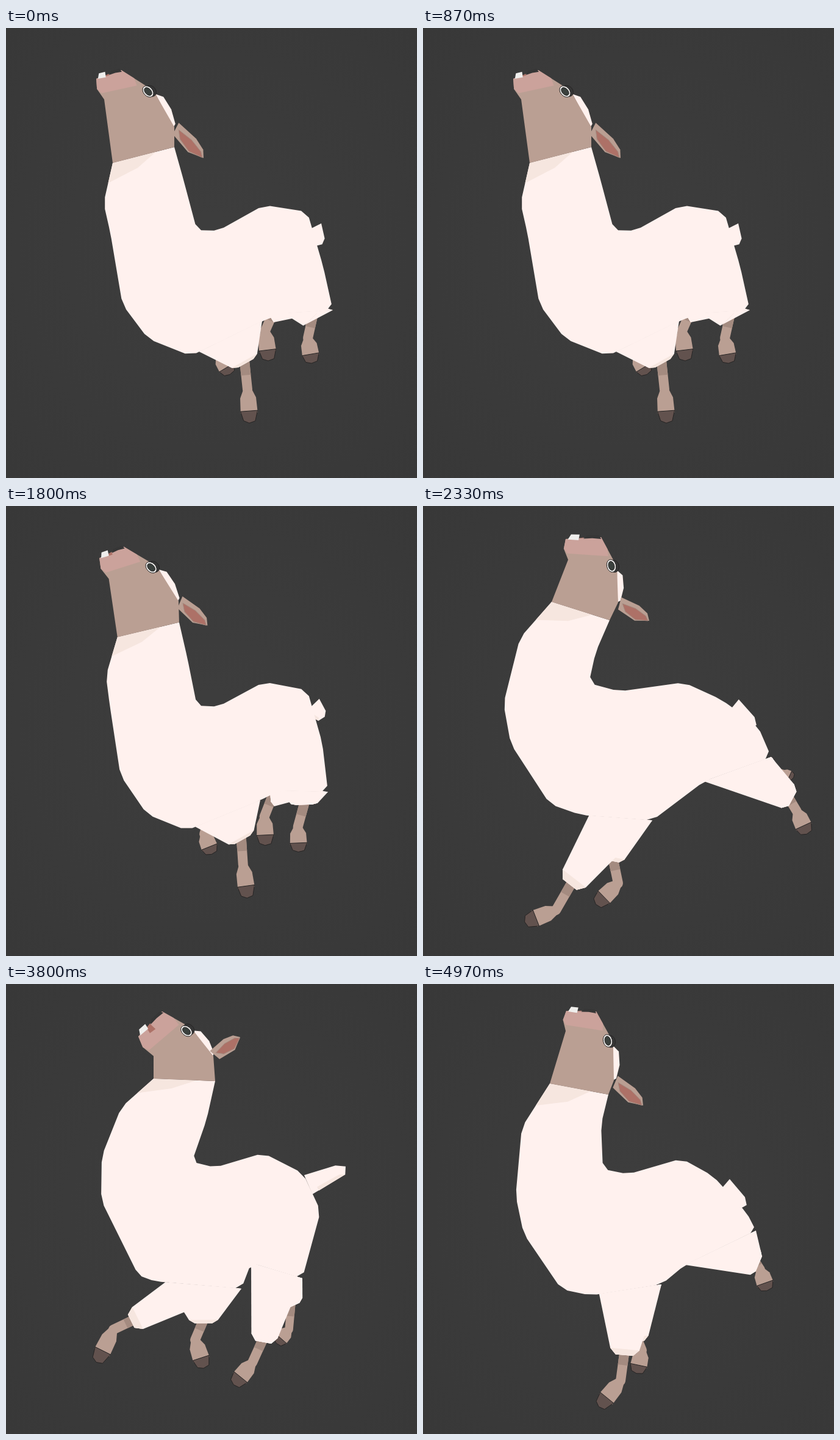
Animation, 674 px wide and 737 px high, one loop 5000 ms. Source, as an HTML page with a canvas:

```html
<!DOCTYPE html>
<html lang="en">
<head>
<meta charset="utf-8">
<title>Galloping llama</title>
<style>
html, body { margin: 0; width: 100%; height: 100%; overflow: hidden; background: #3b3b3b; }
canvas { display: block; }
</style>
</head>
<body>
<canvas id="stage" width="674" height="737"></canvas>
<script>
const ctx = document.getElementById('stage').getContext('2d');
const FPS = 30, FRAMES = 150, LOOP = 5000, STRIDE = 26;

const C = {
  wool: '#fff1ee', woolShade: '#f6e6df', skin: '#ba9f93', skinShade: '#a48b80',
  muzzle: '#cba29b', ear: '#ad7167', hoof: '#62524e', dark: '#363636',
  line: '#262424', white: '#efeeec', pupil: '#3a403d'
};

// Joint positions as x,y pairs.
// neck: collar left, collar right, nape, crook
// rear: hump, croup, rump, haunch, groin, tail tip
// chest: elbow, join, chest, brisket, breast, throat
// head: jaw, lip, nose, eye, poll, ear tip
// legs: cuff, ankle, toe
const tuck = {
  neck: [175,221, 276,195, 292,252, 313,331],
  rear: [423,290, 494,301, 520,390, 536,462, 455,467, 514,352],
  chest: [420,480, 303,537, 233,509, 191,453, 171,335, 160,287],
  head: [161,117, 148,83, 189,69, 233,104, 276,162, 324,213],
  nearFront: [391,545, 396,592, 400,647],
  farFront: [352,508, 350,537, 368,567],
  nearRear: [503,472, 495,508, 502,549],
  farRear: [440,462, 425,496, 431,545]
};
const reach = {
  neck: [242,155, 343,159, 329,222, 305,291],
  rear: [422,277, 487,310, 516,372, 486,482, 402,457, 550,305],
  chest: [386,499, 244,487, 217,477, 156,354, 157,282, 189,202],
  head: [242,118, 217,86, 256,45, 296,77, 340,118, 384,87],
  nearFront: [324,550, 310,583, 325,629],
  farFront: [216,547, 176,566, 149,620],
  nearRear: [424,576, 404,620, 374,657],
  farRear: [468,522, 464,566, 444,589]
};
const stretch = {
  neck: [237,158, 340,172, 315,240, 289,291],
  rear: [418,289, 481,313, 529,385, 517,450, 419,458, 578,325],
  chest: [374,495, 243,494, 203,480, 143,362, 144,286, 190,193],
  head: [239,113, 220,89, 262,53, 300,88, 342,140, 387,112],
  nearFront: [265,574, 242,598, 259,642],
  farFront: [224,575, 196,611, 164,666],
  nearRear: [470,574, 450,615, 416,649],
  farRear: [514,506, 520,532, 528,576]
};
const land = {
  neck: [250,164, 346,202, 317,243, 301,307],
  rear: [424,293, 483,328, 520,395, 526,472, 433,456, 543,368],
  chest: [391,506, 264,508, 219,497, 156,387, 154,313, 190,214],
  head: [268,107, 262,79, 319,66, 338,111, 350,167, 402,174],
  nearFront: [258,592, 220,624, 179,668],
  farFront: [268,594, 267,634, 240,673],
  nearRear: [510,528, 510,567, 488,604],
  farRear: [526,458, 533,462, 553,474]
};
const plant = {
  neck: [211,157, 306,187, 283,240, 272,290],
  rear: [428,289, 489,317, 549,360, 571,411, 461,451, 540,357],
  chest: [376,515, 258,506, 208,488, 144,390, 132,324, 159,216],
  head: [238,88, 234,54, 292,51, 309,98, 320,158, 371,188],
  nearFront: [248,610, 218,662, 167,682],
  farFront: [311,575, 320,618, 284,653],
  nearRear: [598,475, 613,500, 630,537],
  farRear: [572,432, 590,436, 608,444]
};
const pass = {
  neck: [208,163, 304,181, 292,230, 295,303],
  rear: [424,286, 475,314, 531,375, 546,404, 430,460, 524,360],
  chest: [391,492, 275,510, 227,500, 165,409, 152,347, 162,235],
  head: [234,77, 235,44, 284,45, 303,93, 313,158, 361,199],
  nearFront: [331,598, 324,650, 289,693],
  farFront: [350,578, 359,600, 351,638],
  nearRear: [545,456, 553,468, 565,502],
  farRear: [535,440, 540,448, 540,458]
};

// Six strides; the last one is cut off at the end of the loop.
const gait = [[0, tuck], [10, reach], [12, stretch], [14, land], [18, plant], [21, pass]];
const keys = [];
for (let s = 0; s < 6; s++) {
  for (const [at, pose] of gait) keys.push({ at: s * STRIDE + at, pose });
}
keys.splice(-2, 2, { at: FRAMES - 1, pose: pass });

function slope(i, part, n) {
  const a = keys[i - 1], b = keys[i + 1];
  return a && b ? 0.6 * (b.pose[part][n] - a.pose[part][n]) / (b.at - a.at) : 0;
}

// Cubic Hermite blend between neighbouring poses, returned as points.
function poseAt(frame) {
  let i = 0;
  while (i < keys.length - 2 && keys[i + 1].at <= frame) i++;
  const a = keys[i], b = keys[i + 1], span = b.at - a.at;
  const u = (frame - a.at) / span, v = 1 - u, out = {};
  for (const part in tuck) {
    const at = n =>
      a.pose[part][n] * (1 + 2 * u) * v * v + b.pose[part][n] * u * u * (3 - 2 * u) +
      span * u * v * (slope(i, part, n) * v - slope(i + 1, part, n) * u);
    out[part] = Array.from({ length: tuck[part].length / 2 }, (_, k) => [at(2 * k), at(2 * k + 1)]);
  }
  return out;
}

const dist = (a, b) => Math.hypot(b[0] - a[0], b[1] - a[1]) || 1;
const mix = (a, b, t) => [a[0] + (b[0] - a[0]) * t, a[1] + (b[1] - a[1]) * t];
const add = (a, b, c, k) => [a[0] + (c[0] - b[0]) * k, a[1] + (c[1] - b[1]) * k];

// Point at fraction t from a to b, moved sideways by d.
function along(a, b, t, d) {
  const [x, y] = mix(a, b, t), k = d / dist(a, b);
  return [x + (b[1] - a[1]) * k, y - (b[0] - a[0]) * k];
}
const profile = (a, b, shape, k = 1) => shape.map(([t, d]) => along(a, b, t, d * k));

function poly(pts, fill, stroke) {
  ctx.beginPath();
  for (const [x, y] of pts) ctx.lineTo(x, y);
  ctx.closePath();
  ctx.fillStyle = fill;
  ctx.fill();
  if (stroke) {
    ctx.strokeStyle = stroke;
    ctx.stroke();
  }
}

function bar(a, b, width, color, cap) {
  ctx.beginPath();
  ctx.moveTo(...a);
  ctx.lineTo(...b);
  ctx.lineWidth = width;
  ctx.lineCap = cap;
  ctx.strokeStyle = color;
  ctx.stroke();
  ctx.lineWidth = 1;
}

// Cuts every corner but the first two, which meet the head.
function chamfer(pts) {
  const cut = (p, q) => mix(p, q, Math.min(0.2, 10 / dist(p, q)));
  return pts.flatMap((p, i) => i < 2 ? [p]
    : [cut(p, pts[i - 1]), cut(p, pts[(i + 1) % pts.length])]);
}

const FOOT = [[0, 7], [0.25, 13], [0.7, 14], [0.7, -14], [0.25, -13], [0, -7]];
const HOOF = [[0.64, 14], [0.95, 9], [1, -1], [0.92, -10], [0.64, -14]];
const EAR = [[0, 10], [0.55, 13], [0.85, 9], [1, 0], [0.65, -12], [0.1, -10]];
const EAR_IN = [[0.12, 2], [0.5, 6], [0.85, 4], [0.97, -1], [0.65, -10], [0.3, -7]];
const SLEEVE_END = [[1, 1], [1.1, 0.6], [1.1, -0.6], [1, -1]];

function leg([cuff, ankle, toe]) {
  const size = Math.min(1, dist(ankle, toe) / 36);
  bar(cuff, ankle, 16 * size, C.skin, 'round');
  bar(cuff, mix(cuff, ankle, 0.5), 16 * size, C.skinShade, 'butt');
  poly(profile(ankle, toe, FOOT, size), C.skin);
  poly(profile(ankle, toe, HOOF, size), C.hoof, C.line);
}

function sleeve(front, back, cuff, half, shade) {
  const end = profile(mix(front, back, 0.5), cuff, SLEEVE_END, half);
  poly([back, front, ...end], C.wool);
  poly([front, back, ...end], C.wool);
  poly(end, shade);
}

function torso(p) {
  const [collarL, collarR, nape, crook] = p.neck;
  const [hump, croup, rump, haunch, groin, tip] = p.rear;
  const [elbow, join, chest, brisket, breast, throat] = p.chest;
  const shoulder = mix(join, elbow, 0.12);
  const sag = mix(crook, hump, 0.32);
  const dip = [sag[0], sag[1] + 14];

  sleeve(groin, haunch, p.farRear[0], 20, C.wool);
  sleeve(shoulder, elbow, p.farFront[0], 20, C.woolShade);
  sleeve(groin, haunch, p.nearRear[0], 22, C.wool);
  sleeve(shoulder, elbow, p.nearFront[0], 24, C.woolShade);

  const root = mix(croup, rump, 0.3);
  poly(profile(root, tip, [[0, 17], [0.9, 11], [1.15, 3], [1.05, -9], [0, -17]]), C.wool);
  poly(profile(root, tip, [[0.2, -9], [0.9, -5], [1.05, -9], [0.2, -16]]), C.woolShade);
  poly(chamfer([collarL, collarR, nape, crook, dip, hump, croup, rump, haunch, groin,
    elbow, join, chest, brisket, breast, throat]), C.wool);

  const side = mix(collarL, throat, 0.5);
  const fold = add(mix(collarL, collarR, 0.45), collarL, side, 0.6);
  poly([collarL, mix(collarL, collarR, 0.7), fold, side], C.woolShade);
}

function oval([x, y], rx, ry, turn, fill) {
  ctx.beginPath();
  ctx.ellipse(x, y, rx, ry, turn, 0, Math.PI * 2);
  ctx.fillStyle = fill;
  ctx.fill();
  ctx.strokeStyle = C.line;
  ctx.stroke();
}

function head(p) {
  const [collarL, collarR] = p.neck;
  const [jaw, lip, nose, eye, poll, earTip] = p.head;
  const brow = along(jaw, eye, 1 + 9 / dist(jaw, eye), 0);
  const chin = along(jaw, lip, 0.55, 5);
  const bridge = mix(nose, brow, 0.4);
  const open = Math.max(0, Math.min(1, (lip[1] - nose[1] - 10) / 28));

  poly(profile(brow, poll, [[0.1, 0], [0.25, 9], [0.6, 10], [0.95, 4], [1, -2]]), C.wool);
  poly([collarL, jaw, chin, lip, nose, brow, poll, collarR], C.skin);
  poly([mix(jaw, lip, 0.3), chin, lip, nose, bridge, add(bridge, lip, jaw, 0.35)], C.muzzle);
  poly(profile(lip, nose, [[0.35, 0], [0.5, 1], [0.5, -12 * open], [0.3, -10 * open]]), C.ear);
  poly(profile(lip, nose, [[0.06, -1], [0.16, 7], [0.4, 6], [0.36, -3]]), C.white);
  poly(profile(lip, nose, [[0.5, -1], [0.62, 4], [0.95, 3], [1, -3], [0.75, -1]]), C.dark);

  const turn = Math.atan2(poll[1] - nose[1], poll[0] - nose[0]);
  oval(mix(eye, brow, 0.5), 10, 8, turn, C.dark);
  oval(eye, 10.5, 7.5, turn, C.white);
  oval(eye, 7.5, 4.8, turn, C.pupil);
  poly(profile(poll, earTip, EAR), C.skin);
  poly(profile(poll, earTip, EAR_IN), C.ear, C.skinShade);
}

const backdrop = ctx.createRadialGradient(337, 368, 60, 337, 368, 500);
backdrop.addColorStop(0, '#3d3d3d');
backdrop.addColorStop(1, '#383838');

function draw(frame) {
  const p = poseAt(frame);
  ctx.fillStyle = backdrop;
  ctx.fillRect(0, 0, 674, 737);
  for (const name of ['farRear', 'farFront', 'nearRear', 'nearFront']) leg(p[name]);
  torso(p);
  head(p);
}

const start = performance.now();
function tick(now) {
  const t = Math.max(0, now - start) % LOOP;
  draw(Math.min(FRAMES - 1, Math.floor((t + 5) * FPS / 1000)));
  requestAnimationFrame(tick);
}
draw(0);
requestAnimationFrame(tick);
</script>
</body>
</html>
```
